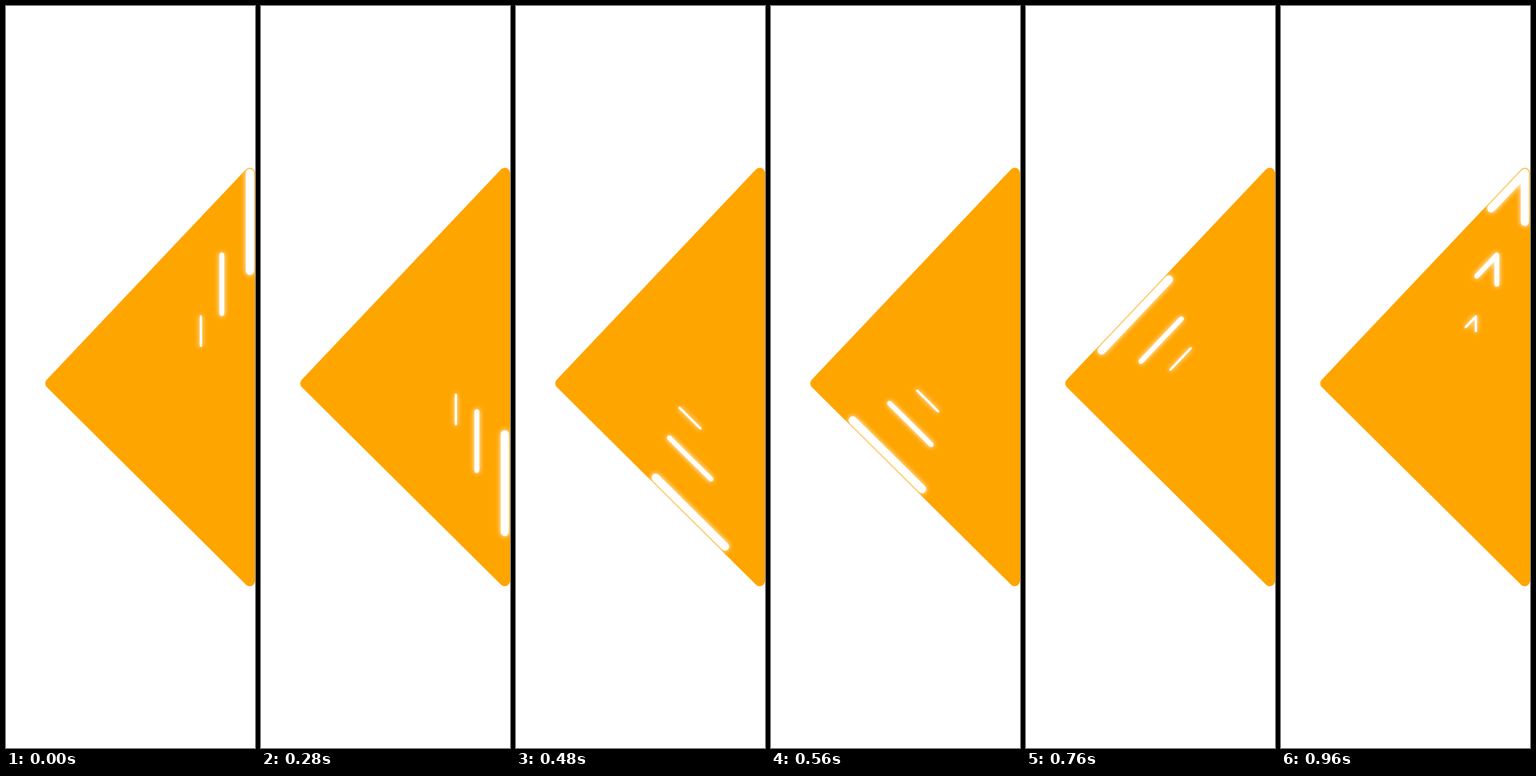
These frames come from a looping animation (431 by 1280 pixels, 1 s). An HTML page with a canvas:

```html
<!DOCTYPE html>
<html lang="en">
<head>
<meta charset="utf-8">
<title>Triangle loader</title>
<style>
  html, body { margin: 0; width: 100%; height: 100%; overflow: hidden; background: #fff; }
  canvas { display: block; }
</style>
</head>
<body>
<canvas id="stage" width="431" height="1280"></canvas>
<script>
const ctx = document.getElementById('stage').getContext('2d');
const corners = [[422, 288], [422, 992], [77, 651]];
const center = [301, 641.6];
const scales = [1, 0.6, 0.3];
const LOOP = 1000, STEP = 40;

function scaled(k) {
  return corners.map(c => c.map((v, i) => center[i] + (v - center[i]) * k));
}

function trace(points) {
  ctx.beginPath();
  points.forEach(p => ctx.lineTo(...p));
  ctx.closePath();
}

function perimeter(points) {
  return points.reduce((sum, [x, y], i) => {
    const [nx, ny] = points[(i + 1) % points.length];
    return sum + Math.hypot(nx - x, ny - y);
  }, 0);
}

function drawBody() {
  ctx.fillStyle = ctx.strokeStyle = '#ffa500';
  ctx.lineWidth = 18;
  trace(corners);
  ctx.fill();
  ctx.stroke();
}

// A dash covering a tenth of the outline, running clockwise from the top corner.
function drawDash(k, progress) {
  const points = scaled(k);
  const length = perimeter(points);
  ctx.strokeStyle = ctx.shadowColor = '#fff';
  ctx.shadowBlur = 10;
  ctx.lineWidth = 14 * k;
  ctx.setLineDash([length * 0.1, length * 0.9]);
  ctx.lineDashOffset = -progress * length;
  trace(points);
  ctx.stroke();
}

function draw(ms) {
  // 25 pictures per second, each holding the latest 60 Hz tick
  const step = Math.floor((ms % LOOP) / STEP);
  const progress = Math.floor(step * 12 / 5) / 60;
  ctx.clearRect(0, 0, 431, 1280);
  ctx.save();
  ctx.lineJoin = ctx.lineCap = 'round';
  drawBody();
  scales.forEach(k => drawDash(k, progress));
  ctx.restore();
}

const start = performance.now();
function tick() {
  draw(performance.now() - start);
  requestAnimationFrame(tick);
}
tick();
</script>
</body>
</html>
```
